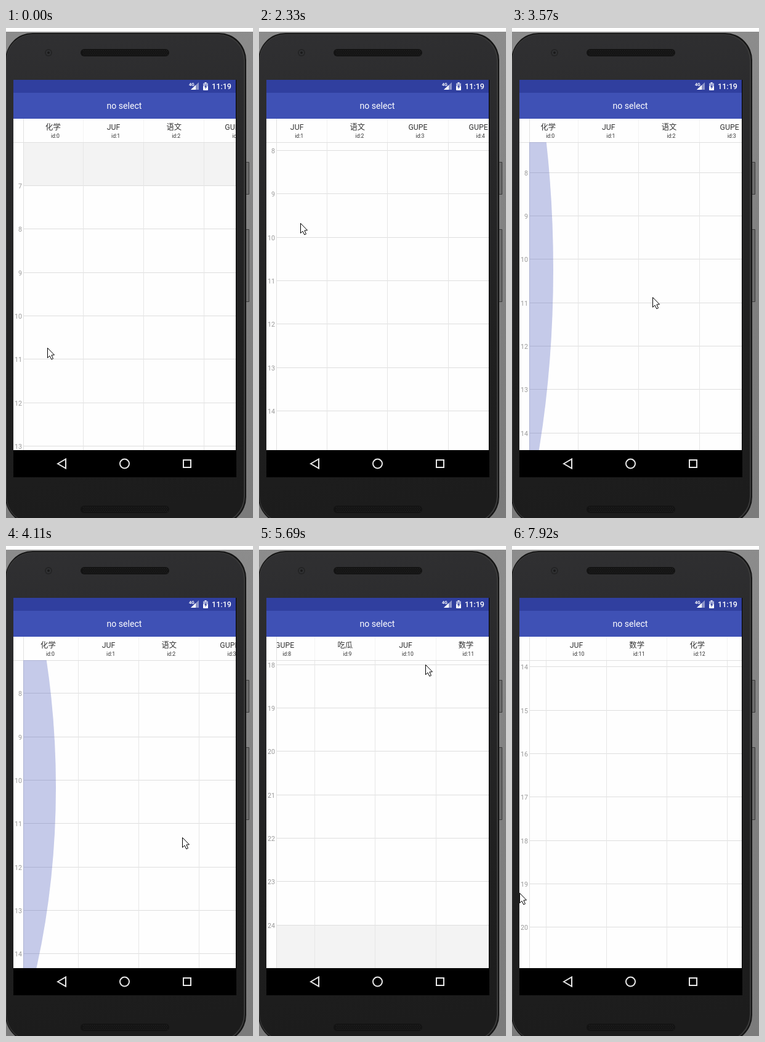
Animation, 401 px wide and 794 px high, one loop 8000 ms. Source, as an HTML page with a canvas:

```html
<!DOCTYPE html>
<html lang="en">
<head>
<meta charset="utf-8">
<title>Timetable scroll</title>
<style>
html, body { margin: 0; width: 100%; height: 100%; overflow: hidden; background: #fff; }
canvas { display: block; width: 401px; height: 794px; }
</style>
</head>
<body>
<canvas id="stage" width="401" height="794"></canvas>
<script>
const LOOP = 8000, STEPS = 59;
const COL = 98.15, ROW = 70.33, FIRST_COL = 26.8, FIRST_HOUR = 255.15;
const GRID = { l: 28, t: 185, r: 373, b: 684 };
const FONT = 'Roboto, "Noto Sans CJK SC", "Noto Sans CJK", sans-serif';
const courses = ['化学', 'JUF', '语文', 'GUPE', 'GUPE', '数学', '语文', '数学',
  'GUPE', '吃瓜', 'JUF', '数学', '化学', '吃瓜', '语文'];

// Ends of the swipes: [step, scroll x, scroll y, pointer x, pointer y]
const swipes = [
  [0, 0, 0, 67, 518],
  [10, 147, 168, 76, 282],
  [22, 88.5, 98.3, 61, 340],
  [27, 0, 90, 270, 460],
  [30, 8, 87, 286, 472],
  [35, 619.8, 837, 33, 197],
  [44, 920, 837, 388, 190],
  [47, 974, 837, 347, 184],
  [56, 953.4, 544, 30, 550],
  [58, 953.4, 552, 12, 562],
];

const ctx = document.getElementById('stage').getContext('2d');

function pose(step) {
  const next = swipes.findIndex(s => s[0] > step);
  if (next < 0) return swipes.at(-1);
  const a = swipes[next - 1], b = swipes[next];
  const k = (step - a[0]) / (b[0] - a[0]);
  return a.map((v, i) => v + (b[i] - v) * k);
}

function rect(color, x, y, w, h, r = 0) {
  ctx.fillStyle = color;
  ctx.beginPath();
  ctx.roundRect(x, y, w, h, r);
  ctx.fill();
}

function disc(color, x, y, r) {
  rect(color, x - r, y - r, 2 * r, 2 * r, r);
}

function shape(points, fill, stroke, width = 1) {
  ctx.beginPath();
  points.forEach(([x, y]) => ctx.lineTo(x, y));
  ctx.closePath();
  if (fill) { ctx.fillStyle = fill; ctx.fill(); }
  if (stroke) { ctx.strokeStyle = stroke; ctx.lineWidth = width; ctx.stroke(); }
}

function text(s, x, y, size, color, align = 'center', weight = 400) {
  ctx.font = `${weight} ${size}px ${FONT}`;
  ctx.fillStyle = color;
  ctx.textAlign = align;
  ctx.fillText(s, x, y);
}

function clipped(l, t, r, b, draw) {
  ctx.save();
  ctx.beginPath();
  ctx.rect(l, t, r - l, b - t);
  ctx.clip();
  draw();
  ctx.restore();
}

function gradient(x0, y0, x1, y1, ...colors) {
  const g = ctx.createLinearGradient(x0, y0, x1, y1);
  colors.forEach((c, i) => g.addColorStop(i / (colors.length - 1), c));
  return g;
}

function speaker(y) {
  rect('#131313', 121, y, 144, 12, 6);
  for (let row = 0; row < 4; row++)
    for (let x = 125 + row % 2 * 1.5; x < 262; x += 3) rect('#2c2c2c', x, y + 2 + row * 2.3, 1, 1);
}

function sideButton(y, h) {
  rect('#3a3a3a', 389, y, 6, h, 1);
  rect('#6c6c6c', 389, y + 1, 5, h - 2);
}

function phone() {
  rect('#fff', 0, 0, 401, 6);
  rect(gradient(0, 6, 0, 794, '#8c8c8c', '#808080', '#7b7b7b'), 0, 6, 401, 788);
  sideButton(217, 53);
  sideButton(326, 118);
  rect('#151515', -1, 8, 391, 796, 44);
  rect('#3a3a3a', 0, 10, 388, 792, 43);
  rect(gradient(0, 10, 90, 794, '#303032', '#272728', '#202020', '#1c1c1c'), 1, 11, 385, 790, 42);
  speaker(34);
  speaker(774);
  disc('#242425', 69, 40, 6);
  disc('#303133', 69, 40, 4);
  disc('#1a1a1a', 69, 40, 2);
}

function bars() {
  rect('#000', 12, 84, 362, 644);
  rect('#303f9f', 12, 84, 361, 21);
  rect('#3f51b5', 12, 105, 361, 42);
  text('no select', 192, 131, 14.1, '#fff');
  text('11:19', 366, 99, 12.6, '#fff', 'right', 500);
  shape([[300, 100], [313, 100], [313, 88]], '#8c94c9');
  shape([[300, 100], [308, 100], [308, 92.5]], '#fff');
  text('4G', 297, 93.5, 7, '#fff', 'left', 700);
  rect('#fff', 322.5, 88, 3, 2);
  rect('#aab1da', 320, 89.5, 8, 5);
  rect('#fff', 320, 94, 8, 7, 1);
  shape([[325, 91], [322, 96], [324, 96], [323, 99.5], [326.5, 94.5], [324.5, 94.5]], '#303f9f');
  shape([[84, 706], [97, 698.5], [97, 713.5]], null, '#e8e8e8', 2);
  ctx.beginPath();
  ctx.arc(192.5, 706, 7.5, 0, 7);
  ctx.stroke();
  ctx.strokeRect(288, 700, 12, 12);
}

function table(sx, sy) {
  const { l, t, r, b } = GRID;
  const hourY = h => Math.round(FIRST_HOUR + (h - 7) * ROW - sy);
  rect('#fefefe', 12, 147, 361, b - 147);

  clipped(12, t, r, b, () => {
    for (const h of [6, 24]) rect('#f3f3f3', l, hourY(h), r - l, ROW);
    for (let h = 7; h <= 24; h++) {
      rect('#dedede', l, hourY(h), r - l, 1);
      text(h, 26, hourY(h) + 5, 10.6, '#999', 'right');
    }
  });
  clipped(l, 147, r, b, () => {
    courses.forEach((name, i) => {
      const x = FIRST_COL + i * COL - sx, mid = x + COL / 2 + .5;
      rect('#f3f3f3', Math.round(x), 147, 1, 38);
      rect('#e6e6e6', Math.round(x), t, 1, b - t);
      text(name, mid, 165, 12.3, '#333');
      text('id:' + i, mid + 3.5, 178, 8.7, '#333');
    });
  });
  rect('#e0e0e0', 12, t, 361, 1);
  rect('#e0e0e0', l, 147, 1, b - 147);
}

// Overscroll light at the left edge, strongest just before step 30
function glow(step) {
  const size = .6 - .07 * Math.abs(step - 29);
  if (size <= .3) return;
  clipped(GRID.l, GRID.t, GRID.r, GRID.b, () => {
    ctx.fillStyle = 'rgba(63, 81, 181, .3)';
    ctx.beginPath();
    ctx.ellipse(GRID.l - 650 * size, 391, 750 * size, 750, 0, 0, 7);
    ctx.fill();
  });
}

function pointer(x, y) {
  ctx.save();
  ctx.translate(Math.round(x) + .5, Math.round(y) + .5);
  shape([[0, 0], [0, 16], [3.5, 12.7], [6.3, 18.5], [9, 17.3], [6.4, 11.6], [11, 11.3]],
    '#fff', '#000');
  ctx.restore();
}

function frame(now) {
  // The screen refreshes in even steps
  const step = Math.floor(now % LOOP / LOOP * STEPS);
  const [, sx, sy, px, py] = pose(step);
  phone();
  bars();
  table(sx, sy);
  glow(step);
  pointer(px, py);
  requestAnimationFrame(frame);
}
requestAnimationFrame(frame);
</script>
</body>
</html>
```
